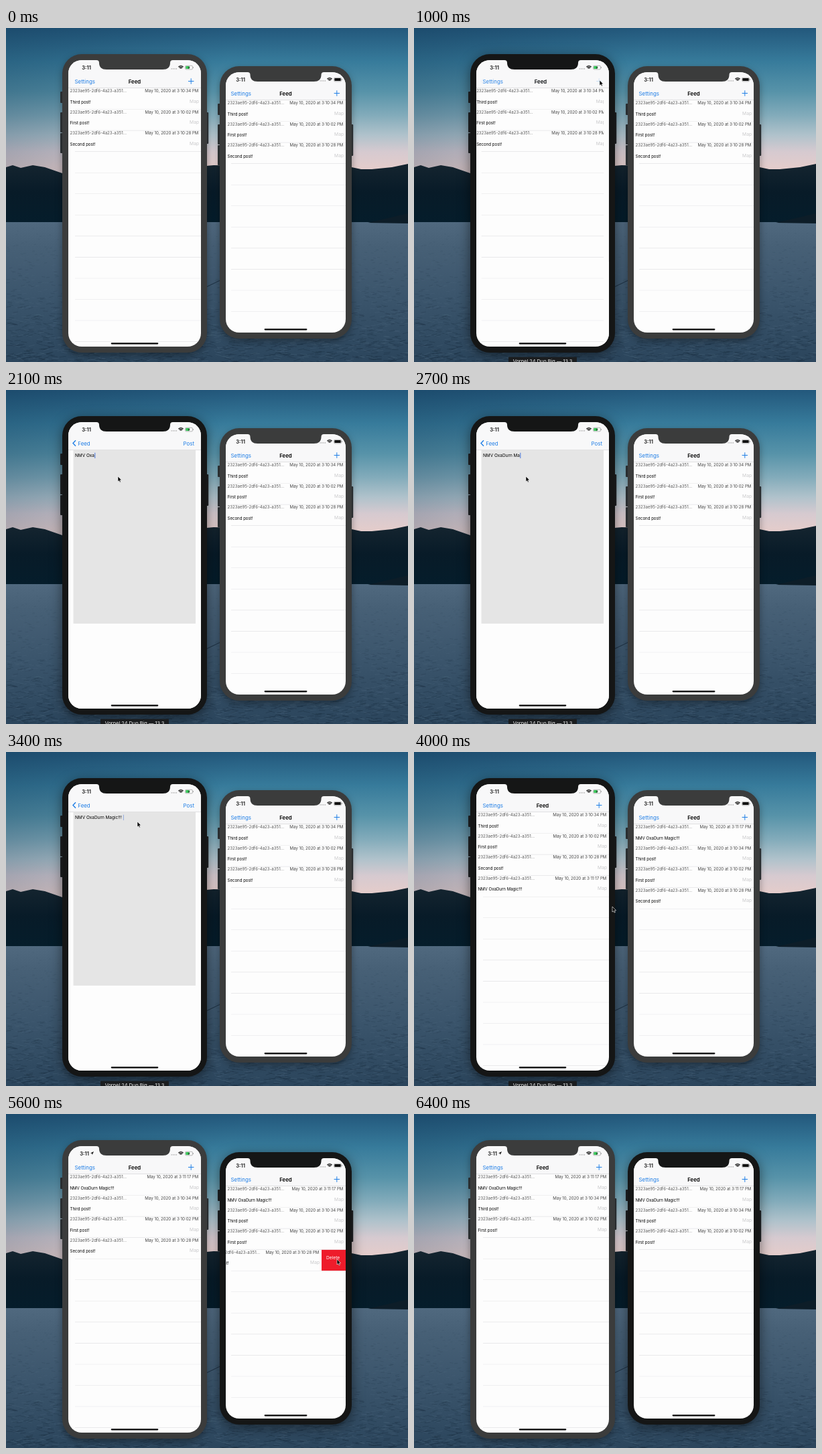
Animation of 600 by 499 pixels, one loop 6.5 s. Source, as an HTML page with a canvas:

```html
<!DOCTYPE html>
<html lang="en">
<head>
<meta charset="utf-8">
<title>Feed sync</title>
<style>
  html, body { margin: 0; width: 100%; height: 100%; overflow: hidden; background: #24496a; }
  canvas { display: block; width: 600px; height: 499px; }
</style>
</head>
<body>
<canvas id="stage" width="600" height="499"></canvas>
<script>
const W = 600, H = 499, LOOP = 6500, STEP = 100, ROW = 31.55;
const BLUE = '#1f7ee6', FONT = 'Inter, "Liberation Sans", sans-serif';
const ctx = document.getElementById('stage').getContext('2d');

const MESSAGE = 'NMV OxaDurn Magic!!!';
const post = (text, time) => ({ text, date: `May 10, 2020 at ${time} PM` });
const third = post('Third post!', '3:10:34');
const first = post('First post!', '3:10:02');
const second = post('Second post!', '3:10:28');
const magic = post(MESSAGE, '3:11:17');

const LEFT = { x: 84, y: 39, w: 216, h: 446, charging: true };
const RIGHT = { x: 319, y: 57, w: 197, h: 407, charging: false };

const clamp = v => Math.max(0, Math.min(1, v));
const smooth = v => { v = clamp(v); return v * v * (3 - 2 * v); };
const progress = (t, from, to) => smooth((t - from) / (to - from));

// Pointer tip: time, x, y
const POINTER = [
  [200, 330, 499], [700, 277, 78], [1000, 277, 78], [1400, 167, 129],
  [3300, 167, 129], [3400, 196, 104], [3500, 272, 78], [3700, 272, 78],
  [4000, 296, 231], [4300, 405, 217], [4800, 405, 217], [5200, 369, 217],
  [5500, 494, 217], [5700, 494, 217], [6100, 600, 330]
];

function pointerAt(t) {
  const i = POINTER.findIndex(k => k[0] >= t);
  if (i < 1) return null;
  const [t0, x0, y0] = POINTER[i - 1], [t1, x1, y1] = POINTER[i];
  const p = progress(t, t0, t1);
  return { x: x0 + (x1 - x0) * p, y: y0 + (y1 - y0) * p };
}

function box(g, x, y, w, h, r, fill) {
  g.beginPath();
  g.roundRect(x, y, w, h, r);
  g.fillStyle = fill;
  g.fill();
}

function polygon(g, points, fill) {
  g.beginPath();
  points.forEach(([x, y]) => g.lineTo(x, y));
  g.closePath();
  g.fillStyle = fill;
  g.fill();
}

function stroke(points, color, width) {
  ctx.beginPath();
  points.forEach(([x, y]) => ctx.lineTo(x, y));
  ctx.strokeStyle = color;
  ctx.lineWidth = width;
  ctx.stroke();
}

function label(str, x, y, size, color, { align = 'left', weight = 400, alpha = 1 } = {}) {
  ctx.save();
  ctx.globalAlpha *= alpha;
  ctx.font = `${weight} ${size}px ${FONT}`;
  ctx.textAlign = align;
  ctx.fillStyle = color;
  ctx.fillText(str, x, y);
  ctx.restore();
}

function clipped(x, y, w, h, draw) {
  ctx.save();
  ctx.beginPath();
  ctx.rect(x, y, w, h);
  ctx.clip();
  draw();
  ctx.restore();
}

function verticalGradient(g, y0, y1, colors) {
  const grad = g.createLinearGradient(0, y0, 0, y1);
  colors.forEach(([at, color]) => grad.addColorStop((at - y0) / (y1 - y0), color));
  return grad;
}

function makeLandscape() {
  const canvas = document.createElement('canvas');
  canvas.width = W;
  canvas.height = H;
  const g = canvas.getContext('2d');
  let seed = 7;
  const random = () => (seed = seed * 16807 % 2147483647) / 2147483647;

  g.fillStyle = verticalGradient(g, 0, 235, [
    [0, '#23587c'], [50, '#377b9b'], [95, '#5793a9'], [130, '#82abba'],
    [160, '#b0c2cb'], [185, '#d6cad0'], [208, '#e3cccb'], [235, '#e3cccb']]);
  g.fillRect(0, 0, W, 240);
  const dusk = g.createLinearGradient(0, 0, 280, 150);
  dusk.addColorStop(0, 'rgba(16,52,82,.35)');
  dusk.addColorStop(1, 'rgba(16,52,82,0)');
  g.fillStyle = dusk;
  g.fillRect(0, 0, W, 240);

  const hills = verticalGradient(g, 205, 292, [[205, '#14242f'], [245, '#081b28'], [292, '#051d2b']]);
  polygon(g, [[0, 208], [10, 205], [22, 209], [40, 205], [58, 208], [84, 217], [200, 215],
    [310, 205], [420, 208], [516, 208], [530, 211], [546, 211], [576, 208], [600, 203],
    [600, 292], [0, 292]], hills);

  g.fillStyle = verticalGradient(g, 289, H, [[289, '#50697f'], [325, '#476076'], [400, '#3b556c'], [H, '#2b455c']]);
  g.fillRect(0, 290, W, H - 290);
  polygon(g, [[540, 291], [570, 284], [600, 277], [600, 292]], '#0d1d28');

  for (let i = 0; i < 2600; i++) {
    const depth = random() ** 0.7, x = random() * W, y = 294 + depth * 205;
    const length = 2 + depth * 8, slope = (random() - 0.5) * (0.5 + depth * 6);
    g.strokeStyle = random() < 0.6 ? `rgba(13,29,44,${0.08 + depth * 0.22})` : `rgba(130,156,178,${0.05 + depth * 0.1})`;
    g.lineWidth = 0.5 + depth * 0.4;
    g.beginPath();
    g.moveTo(x, y);
    g.lineTo(x + length, y + slope);
    g.stroke();
  }
  g.strokeStyle = 'rgba(20,38,55,.65)';
  g.lineWidth = 1.3;
  g.beginPath();
  g.moveTo(280, 396);
  g.lineTo(330, 372);
  g.stroke();
  return canvas;
}

function drawCase(phone, active) {
  const { x, y, w, h } = phone, color = active ? '#151616' : '#3b3c3c';
  const button = active ? '#202326' : '#303538';
  [[56, 17], [87, 30], [118, 30]].forEach(([dy, len]) => box(ctx, x - 3, y + dy, 5, len, 1, button));
  box(ctx, x + w - 2, y + 87, 4.2, 47, 1, button);
  ctx.save();
  ctx.shadowColor = active ? 'rgba(0,0,0,.5)' : 'rgba(0,0,0,.35)';
  ctx.shadowBlur = active ? 18 : 11;
  ctx.shadowOffsetY = 4;
  box(ctx, x, y, w, h, 29, color);
  ctx.restore();
}

function drawStatus(s, phone, located) {
  const right = s.x + s.w, y = s.y + 11;
  label('3:11', s.x + (located ? 24 : phone.charging ? 27 : 22), s.y + 13.7, 7.6, '#111',
    { align: 'center', weight: 600 });
  if (located) polygon(ctx, [[s.x + 38, s.y + 8], [s.x + 33, s.y + 10.6], [s.x + 35.4, s.y + 10.9], [s.x + 35.7, s.y + 13.3]], '#111');

  const edge = right + (phone.charging ? 0 : 6);
  for (let i = 0; i < 4; i++) box(ctx, edge - 44.5 + i * 2.4, y + 1.3, 1.3, 1.3, 0.6, '#8a8a8a');
  const wx = edge - 30, wy = y + 2.8;
  ctx.strokeStyle = '#111';
  ctx.lineWidth = 1.1;
  [2, 3.6, 5.2].forEach(r => {
    ctx.beginPath();
    ctx.arc(wx, wy, r, -Math.PI * 0.75, -Math.PI * 0.25);
    ctx.stroke();
  });
  const bx = edge - 23.5, by = y - 2.7;
  ctx.beginPath();
  ctx.roundRect(bx, by, 11, 5.6, 1.6);
  ctx.strokeStyle = '#8b8b8b';
  ctx.lineWidth = 0.6;
  ctx.stroke();
  box(ctx, bx + 0.8, by + 0.8, phone.charging ? 5.5 : 9.4, 4, 0.8, phone.charging ? '#38c759' : '#111');
  box(ctx, bx + 11.6, by + 1.9, 0.8, 1.8, 0.4, '#8b8b8b');
  if (phone.charging) polygon(ctx, [[bx + 6.5, by + 0.6], [bx + 4, by + 3.1], [bx + 5.4, by + 3.1],
    [bx + 4.6, by + 5.1], [bx + 7.2, by + 2.5], [bx + 5.8, by + 2.5]], '#222');
}

function drawNav(s, push) {
  const y = s.y + 34.5, mid = s.x + s.w / 2, right = s.x + s.w;
  const fade = clamp(1 - push * 1.6), plusAlpha = push > 0 ? 0.2 * fade : 1;
  box(ctx, s.x, s.y, s.w, 42, 0, '#f8f8f9');
  box(ctx, s.x, s.y + 41.6, s.w, 0.5, 0, '#c9c9cb');
  label('Settings', s.x + (s.w > 190 ? 9.5 : 7.5), y, 7.9, BLUE, { alpha: fade });

  const titleX = mid - 75.5 * push;
  label('Feed', titleX, y, 7.8, '#000', { align: 'center', weight: 600, alpha: 1 - push });
  label('Feed', titleX, y, 7.9, BLUE, { align: 'center', alpha: push });

  const px = right - (s.w > 190 ? 14.8 : 13.2), py = s.y + 31.5;
  ctx.save();
  ctx.globalAlpha = plusAlpha;
  stroke([[px - 4.2, py], [px + 4.2, py]], BLUE, 1);
  stroke([[px, py - 4.2], [px, py + 4.2]], BLUE, 1);
  ctx.globalAlpha = push;
  stroke([[s.x + 11, py - 4.3], [s.x + 7, py], [s.x + 11, py + 4.3]], BLUE, 1.4);
  ctx.restore();
  label('Post', right - 10 + (1 - push) * 30, y, 7.9, BLUE, { align: 'right', alpha: push * push });
}

function drawRow(item, s, y, swipe) {
  const x = s.x - swipe, right = x + s.w;
  label('2323ae95-2df6-4a23-a351…', x + 2.5, y + 6.2, 6.1, '#555');
  label(item.date, right - 3.7, y + 6.2, 6.1, '#444', { align: 'right' });
  label(item.text, x + 2.5, y + 22.6, 6.1, '#000');
  label('Map', right - 3, y + 21.5, 6.7, '#c9c9cb', { align: 'right' });
  if (swipe > 0) clipped(right, y, swipe, ROW, () => {
    box(ctx, right, y, swipe, ROW, 0, '#ee1c2b');
    label('Delete', right + 7, y + 14.5, 6.7, '#fff');
  });
}

function drawFeed(s, items, shift, swipe, collapse) {
  const top = s.y + 42;
  const view = { ...s, x: s.x - shift };
  for (let i = 1; top + i * ROW < s.y + s.h - 6; i++)
    box(ctx, view.x + (s.w > 190 ? 10 : 8), top + i * ROW - 0.3, s.w, 0.6, 0, '#e3e3e6');
  items.forEach((item, i) => {
    const last = i === items.length - 1, y = top + i * ROW;
    if (last && collapse > 0) clipped(s.x, y, s.w, ROW * (1 - collapse), () => drawRow(item, view, y, swipe));
    else drawRow(item, view, y, last ? swipe : 0);
  });
}

function drawComposer(s, offset, text, caretAlpha) {
  const x = s.x + offset, y = s.y + 42;
  box(ctx, x, y, s.w, s.h - 42, 0, '#fdfdfd');
  box(ctx, x + 7.5, y, 182.5, 259, 0, '#e5e5e5');
  label(text, x + 10, y + 10.3, 6.45, '#000');
  ctx.font = `400 6.45px ${FONT}`;
  ctx.globalAlpha = caretAlpha;
  box(ctx, x + 10.4 + ctx.measureText(text).width, y + 3.7, 0.9, 8.3, 0, '#3468d8');
  ctx.globalAlpha = 1;
}

function drawNotch(s, color) {
  const mid = s.x + s.w / 2, y = s.y, half = 53, depth = 14;
  ctx.beginPath();
  ctx.moveTo(mid - half - 4, y - 1);
  ctx.lineTo(mid - half - 4, y);
  ctx.quadraticCurveTo(mid - half, y, mid - half, y + 4);
  ctx.quadraticCurveTo(mid - half, y + depth, mid - half + 11, y + depth);
  ctx.lineTo(mid + half - 11, y + depth);
  ctx.quadraticCurveTo(mid + half, y + depth, mid + half, y + 4);
  ctx.quadraticCurveTo(mid + half, y, mid + half + 4, y);
  ctx.lineTo(mid + half + 4, y - 1);
  ctx.fillStyle = color;
  ctx.fill();
}

function drawPhone(phone, state) {
  const { items, active, located = false, push = 0, text = '', caret = 0, swipe = 0, collapse = 0 } = state;
  const s = { x: phone.x + 9, y: phone.y + 9, w: phone.w - 18, h: phone.h - 18 };
  drawCase(phone, active);
  ctx.save();
  ctx.beginPath();
  ctx.roundRect(s.x, s.y, s.w, s.h, 20);
  ctx.clip();
  box(ctx, s.x, s.y, s.w, s.h, 0, '#fdfdfd');
  if (push < 1) drawFeed(s, items, push * s.w * 0.3, swipe, collapse);
  if (push > 0) drawComposer(s, (1 - push) * s.w, text, caret);
  drawNav(s, push);
  drawStatus(s, phone, located);
  drawNotch(s, active ? '#151616' : '#3b3c3c');
  const bar = s.w * 0.357;
  box(ctx, s.x + (s.w - bar) / 2, s.y + s.h - 5.8, bar, 2.3, 1.15, '#050505');
  ctx.restore();
}

function drawPointer({ x, y }) {
  const shape = [[0, 0], [0, 8], [1.8, 6.4], [3, 9], [4.4, 8.4], [3.2, 5.8], [5.6, 5.7]]
    .map(([dx, dy]) => [x + dx, y + dy]);
  polygon(ctx, shape, '#000');
  stroke([...shape, shape[0]], '#fff', 0.6);
}

const landscape = makeLandscape();

function drawScene(t) {
  ctx.drawImage(landscape, 0, 0);
  const leftActive = t >= 600 && t < 4200, rightActive = t >= 4200;
  const push = progress(t, 940, 1440) * (1 - progress(t, 3550, 3950));
  const typed = Math.max(0, Math.floor(7 + (t - 2100) / 85));
  const pointer = pointerAt(t);

  let leftItems = [third, first, second];
  if (t >= 6000) leftItems = [magic, third, first];
  else if (t >= 4400) leftItems = [magic, third, first, second];
  else if (t >= 3800) leftItems = [third, first, second, magic];

  let rightItems = [third, first, second];
  if (t >= 6000) rightItems = [magic, third, first];
  else if (t >= 3800) rightItems = [magic, third, first, second];

  drawPhone(LEFT, {
    items: leftItems, active: leftActive, located: t >= 4400, push,
    text: (MESSAGE + ' ').slice(0, typed), caret: t < 1500 ? 0 : t < 3300 ? 1 : 0.5
  });
  drawPhone(RIGHT, {
    items: rightItems, active: rightActive,
    swipe: t < 6000 ? 36 * progress(t, 4800, 5200) : 0,
    collapse: t < 6000 ? progress(t, 5600, 6000) : 0
  });

  if (leftActive) {
    box(ctx, 141, 491.5, 102, 12, 1, '#1b1d1f');
    label('Vornel 24 Duo Big — 13.3', 192, 501.3, 7.4, '#f2f2f2', { align: 'center' });
  }
  if (pointer) drawPointer(pointer);
}

function tick() {
  const t = performance.now() % LOOP;
  drawScene(Math.floor(t / STEP) * STEP);
  requestAnimationFrame(tick);
}
tick();
</script>
</body>
</html>
```
